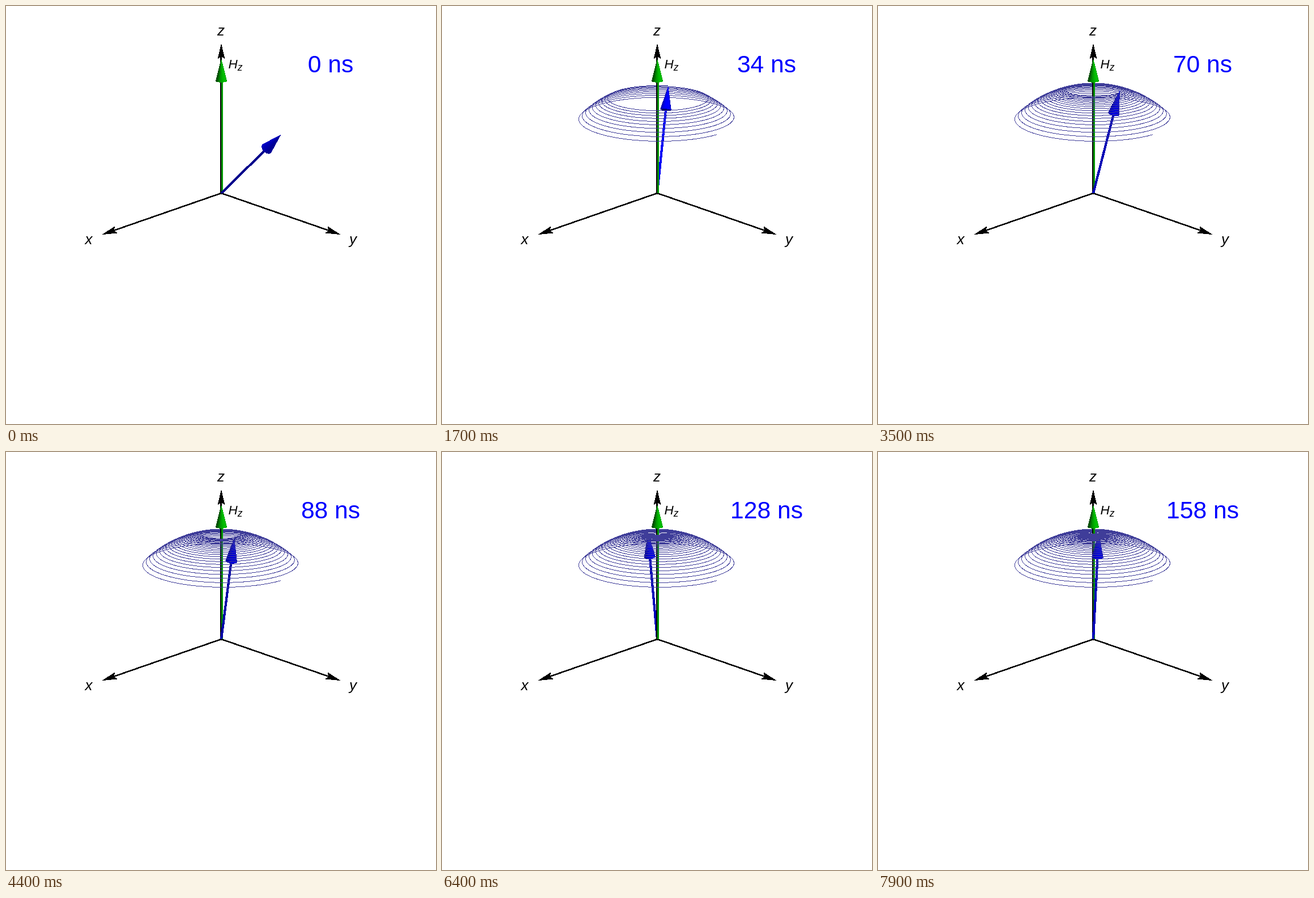
An HTML page that plays this animation: 759 by 737 pixels, repeating every 8000 ms.

```html
<!DOCTYPE html>
<html lang="en">
<head>
<meta charset="utf-8">
<title>Damped precession</title>
<style>
  html, body { margin: 0; width: 100%; height: 100%; overflow: hidden; background: #fff; }
  svg { position: absolute; left: 0; top: 0; display: block; }
  #scene { shape-rendering: crispEdges; }
  text { font-family: "Liberation Sans", Arial, sans-serif; text-anchor: middle; }
  .axis { font-size: 26px; font-style: italic; }
  .field { font-size: 22.5px; font-style: italic; text-anchor: start; }
  .sub { font-size: 17.5px; }
  #clock { font-size: 42.6px; fill: #00f; }
</style>
</head>
<body>
<svg width="759" height="737">
  <g id="scene"></g>
  <text class="axis" x="379.5" y="52">z</text>
  <text class="axis" x="146" y="420">x</text>
  <text class="axis" x="612.5" y="420">y</text>
  <text class="field" x="392.5" y="110">H<tspan class="sub" dy="4">z</tspan></text>
  <text id="clock" x="573" y="117">0 ns</text>
</svg>
<script>
const scene = document.getElementById('scene');
const clock = document.getElementById('clock');

// Camera: perspective, tilted down, centred on the origin
const CX = 380, CY = 330, FOCAL = 1568, DIST = 5.92;
const SIN = 0.347, COS = Math.sqrt(1 - SIN * SIN);

// Magnetisation: precession with damping, tan(theta/2) decays exponentially
const RADIUS = 0.727, OMEGA = 1.7857, DAMPING = 0.01;
const STEP_MS = 100, STEPS = 80, NS_PER_STEP = 2, SAMPLES_PER_NS = 20;

// right, front, up -> view axes: right, up, towards the viewer
const view = (a, b, z) => [a, z * COS - b * SIN, b * COS + z * SIN];
const scale = (v, k) => v.map(c => c * k);
const add = (v, w) => v.map((c, i) => c + w[i]);
const dot = (v, w) => v[0] * w[0] + v[1] * w[1] + v[2] * w[2];
const cross = (v, w) => [
  v[1] * w[2] - v[2] * w[1], v[2] * w[0] - v[0] * w[2], v[0] * w[1] - v[1] * w[0]];
const unit = v => scale(v, 1 / Math.hypot(...v));
const project = v => {
  const k = FOCAL / (DIST - v[2]);
  return [CX + v[0] * k, CY - v[1] * k];
};

function moment(ns) {
  const theta = 2 * Math.atan(Math.tan(Math.PI / 8) * Math.exp(-DAMPING * OMEGA * ns));
  const phi = Math.PI / 4 - OMEGA * ns;
  const rho = RADIUS * Math.sin(theta);
  const b = rho * Math.cos(phi);
  return { b, pos: view(rho * Math.sin(phi), b, RADIUS * Math.cos(theta)) };
}

// Each light: direction and its red, green, blue strength
const LIGHTS = [
  [unit([3, -1, 3]), [0.4, 0.2, 0.2]],
  [unit([1, 1, 1]), [0.2, 0.36, 0.2]],
  [unit([-1, 3, 3]), [0.2, 0.2, 0.4]]
];
const AMBIENT = [0.312, 0.188, 0.4];

function shade(color, normal) {
  const rgb = color.map((c, i) => {
    const lit = LIGHTS.reduce(
      (sum, [dir, power]) => sum + power[i] * Math.max(0, dot(dir, normal)), AMBIENT[i]);
    return Math.round(255 * c * Math.min(1, lit));
  });
  return `rgb(${rgb})`;
}

// Shapes are returned as SVG markup
const coords = p => p[0].toFixed(2) + ' ' + p[1].toFixed(2);
const polygon = (points, color) =>
  `<polygon points="${points.map(coords).join(' ')}" fill="${color}"/>`;
const stroke = (d, width, color) =>
  `<path d="${d}" fill="none" stroke="${color}" stroke-width="${width}"/>`;

function cone(tip, length, radius, color) {
  const dir = unit(tip);
  const side = unit(cross(dir, [0.31, 0.2, 0.93]));
  const other = cross(dir, side);
  const base = add(tip, scale(dir, -length));
  const toEye = add([0, 0, DIST], scale(tip, -1));
  const n = 32;
  const radial = i => {
    const t = i / n * 2 * Math.PI;
    return add(scale(side, Math.cos(t)), scale(other, Math.sin(t)));
  };
  const rim = [...Array(n).keys()].map(i => add(base, scale(radial(i), radius)));
  let out = polygon(rim.map(project), shade(color, scale(dir, -1)));
  for (let i = 0; i < n; i++) {
    const normal = unit(add(scale(radial(i + 0.5), length), scale(dir, radius)));
    if (dot(normal, toEye) <= 0) continue;
    out += polygon([tip, rim[i], rim[(i + 1) % n]].map(project), shade(color, normal));
  }
  return out;
}

function arrow(tip, head, radius, color, width, shaft, shift = 0) {
  const [x, y] = project(add(tip, scale(unit(tip), -head)));
  const d = `M${coords([CX + shift, CY])}L${coords([x + shift, y])}`;
  return stroke(d, width, shaft) + cone(tip, head, radius, color);
}

// Flat black arrow with a notched head
function axis(end, shift = 0) {
  const [x, y] = project(end);
  const len = Math.hypot(x - CX, y - CY);
  const ux = (x - CX) / len, uy = (y - CY) / len;
  const at = (back, off) => [x - ux * back - uy * off, y - uy * back + ux * off];
  const d = `M${coords([CX + shift, CY])}L${coords([at(20, 0)[0] + shift, at(20, 0)[1]])}`;
  return stroke(d, 2.6, '#000') +
    polygon([at(0, 0), at(27, 6.5), at(23, 0), at(27, -6.5)], '#000');
}

const GREEN = [0, 1, 0], BLUE = [0, 0, 1];
const H = Math.SQRT1_2;
const ground = axis(view(-H, H, 0)) + axis(view(H, H, 0));
const uprights = axis(view(0, 0, 1), -0.5) +
  arrow(view(0, 0, 0.905), 0.145, 0.0365, GREEN, 3, '#009600', 1);

function blueArrow({ pos, b }) {
  const level = Math.round(Math.min(255, Math.max(140, 185 - 200 * b)));
  return arrow(pos, 0.163, 0.0375, BLUE, 4.2, `rgb(0,0,${level})`);
}

// Trail layers: inner side of the dome, outer side behind z, outer side before z
const INSIDE = 0, BEHIND = 1, BEFORE = 2;
const trail = [];
for (let i = 0; i <= (STEPS - 1) * NS_PER_STEP * SAMPLES_PER_NS; i++) {
  const { pos, b } = moment(i / SAMPLES_PER_NS);
  const facing = pos[2] * DIST > RADIUS * RADIUS;
  trail.push({ p: coords(project(pos)), layer: !facing ? INSIDE : b < 0 ? BEHIND : BEFORE });
}

function drawTrail(layer, count) {
  let d = '', open = false;
  for (let i = 1; i <= count; i++) {
    const on = trail[i].layer === layer;
    if (on) d += (open ? '' : 'M' + trail[i - 1].p) + 'L' + trail[i].p;
    open = on;
  }
  return d && stroke(d, 1, '#3f3d99');
}

function draw(step) {
  const ns = step * NS_PER_STEP, count = ns * SAMPLES_PER_NS;
  const m = moment(ns);
  const blue = blueArrow(m);
  scene.innerHTML = [
    ground,
    drawTrail(INSIDE, count),
    m.b < 0 ? blue : '',
    drawTrail(BEHIND, count),
    uprights,
    m.b < 0 ? '' : blue,
    drawTrail(BEFORE, count)
  ].join('');
  clock.textContent = ns + ' ns';
}

let shown = -1;
const start = performance.now();
function tick(now) {
  const step = Math.floor(Math.max(0, now - start) / STEP_MS) % STEPS;
  if (step !== shown) draw(shown = step);
  requestAnimationFrame(tick);
}
tick(start);
</script>
</body>
</html>
```
